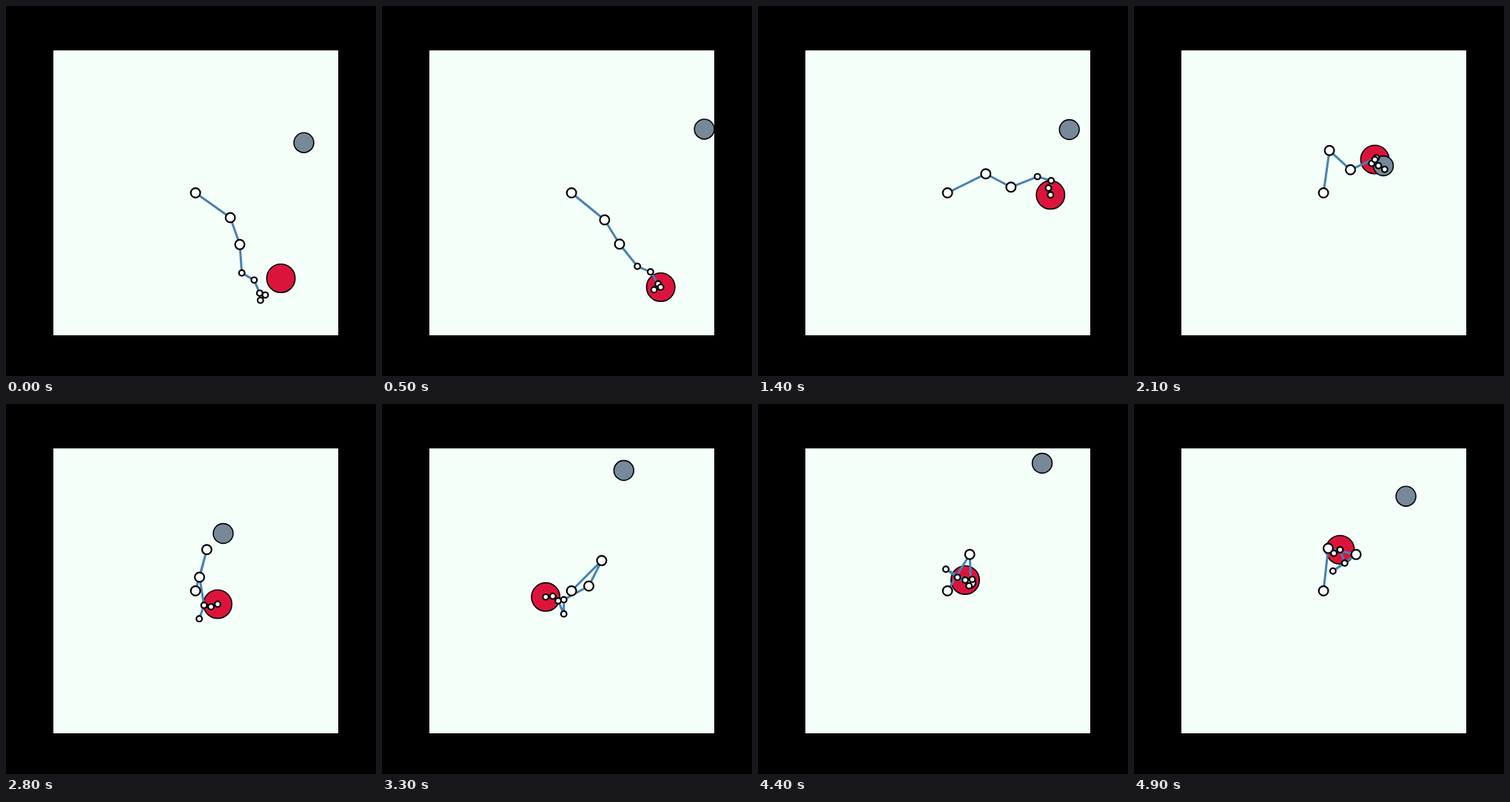
An HTML page with a canvas for the animation above (5 s loop, 500 px wide and 500 px high).

```html
<!DOCTYPE html>
<html>
<head>
<meta charset="utf-8">
<title>Jointed arm following a disc</title>
<style>
html, body { margin: 0; height: 100%; overflow: hidden; background: #000; }
canvas { display: block; }
</style>
</head>
<body>
<canvas id="stage" width="500" height="500"></canvas>
<script>
const ctx = document.getElementById('stage').getContext('2d');
const LOOP = 5000, STEP = 100, SIZE = 385;
const BASE = [256.1, 252.5];
const LINKS = [0.15, 0.1, 0.1, 0.05, 0.05, 0.025, 0.025].map(k => k * SIZE);

// Key poses: time, then each joint's turn in degrees from the link before it
const POSES = [
  [0, 35.5, 35, 15.5, -56, 37, 17, -131],
  [1000, 9.3, 39, -26, -6, 54, 119, -180],
  [1400, -26, 54, -49.5, 37.5, 75.5, 161, -180],
  [2100, -82, 124.4, -67.3, 79, 150, 174, -138],
  [2800, -75, 180, -24, 28.5, 180, 82, -34],
  [3800, -26, 180, 95.5, -141, 90, -99, -74],
  [4900, -83.6, 97, 130.5, -178.5, -76, -101, -178.5]
];
// Way points: time, red x and y, gray x and y
const PATH = [
  [0, 371.5, 368, 402.5, 184.7],
  [300, 371, 387, 436, 150],
  [1000, 399.5, 328, 432, 233],
  [1400, 395.3, 255.3, 420.7, 167],
  [2100, 325.5, 207.5, 337, 216],
  [2800, 286, 270.5, 293.5, 175],
  [3500, 209, 254, 335, 73],
  [3800, 242.5, 233.5, 320, 106],
  [4400, 280, 238, 384, 80],
  [4900, 278.5, 197, 367.5, 124.7]
];

// Monotone cubic through one column of the keys
function column(keys, c, t) {
  const last = keys.length - 1;
  let i = 0;
  while (i < last - 1 && t >= keys[i + 1][0]) i++;
  const slope = k => (keys[k + 1][c] - keys[k][c]) / (keys[k + 1][0] - keys[k][0]);
  const tangent = k => {
    const a = slope(Math.max(0, k - 1)), b = slope(Math.min(last - 1, k));
    return a * b > 0 ? 2 * a * b / (a + b) : 0;
  };
  const h = keys[i + 1][0] - keys[i][0], u = (t - keys[i][0]) / h, v = 1 - u;
  return v * v * (1 + 2 * u) * keys[i][c] + u * u * (3 - 2 * u) * keys[i + 1][c]
    + h * u * v * (v * tangent(i) - u * tangent(i + 1));
}
const sample = (keys, t) => keys[0].slice(1).map((_, i) => column(keys, i + 1, t));

function jointsOf(angles) {
  let [x, y] = BASE, dir = 0;
  const pts = [[x, y]];
  angles.forEach((a, i) => {
    dir += a;
    x += LINKS[i] * Math.cos(dir);
    y += LINKS[i] * Math.sin(dir);
    pts.push([x, y]);
  });
  return pts;
}

// Damped least squares pulls the tip to the goal; joints stop at half a turn
function reach(angles, goal) {
  for (let n = 0; n < 12; n++) {
    const pts = jointsOf(angles), [tx, ty] = pts[LINKS.length];
    const jac = angles.map((_, i) => [pts[i][1] - ty, tx - pts[i][0]]);
    let a = 20, b = 0, d = 20;
    for (const [p, q] of jac) { a += p * p; b += p * q; d += q * q; }
    const ex = goal[0] - tx, ey = goal[1] - ty, det = a * d - b * b;
    const fx = (d * ex - b * ey) / det, fy = (a * ey - b * ex) / det;
    angles = angles.map((v, i) =>
      Math.max(-Math.PI, Math.min(Math.PI, v + jac[i][0] * fx + jac[i][1] * fy)));
  }
  return jointsOf(angles);
}

function disc([x, y], r, fill, line) {
  ctx.beginPath();
  ctx.arc(x, y, r, 0, 2 * Math.PI);
  ctx.fillStyle = fill;
  ctx.fill();
  ctx.lineWidth = line;
  ctx.strokeStyle = '#000';
  ctx.stroke();
}

function draw(t) {
  const [rx, ry, gx, gy] = sample(PATH, t);
  const angles = sample(POSES, t).map(a => a * Math.PI / 180);
  const [tx, ty] = jointsOf(angles)[LINKS.length];
  const pull = Math.min(1, t / 400);
  const arm = reach(angles, [tx + (rx - tx) * pull, ty + (ry - ty) * pull]);

  ctx.save();
  ctx.beginPath();
  ctx.rect(64, 60, SIZE, SIZE);
  ctx.clip();
  ctx.fillStyle = '#f5fffa';
  ctx.fillRect(64, 60, SIZE, SIZE);
  disc([rx, ry], 19.2, '#dc143c', 1.6);
  disc([gx, gy], 13.4, '#778899', 1.6);
  ctx.beginPath();
  arm.forEach(p => ctx.lineTo(...p));
  ctx.lineWidth = 3;
  ctx.lineJoin = 'round';
  ctx.strokeStyle = '#4682b4';
  ctx.stroke();
  arm.forEach((p, i) => disc(p, i < 3 ? 6.4 : 3.85, '#fff', 2.2));
  ctx.restore();
}

const start = performance.now();
function tick() {
  const t = (performance.now() - start) % LOOP;
  draw(Math.floor(t / STEP) * STEP);
  requestAnimationFrame(tick);
}
tick();
</script>
</body>
</html>
```
